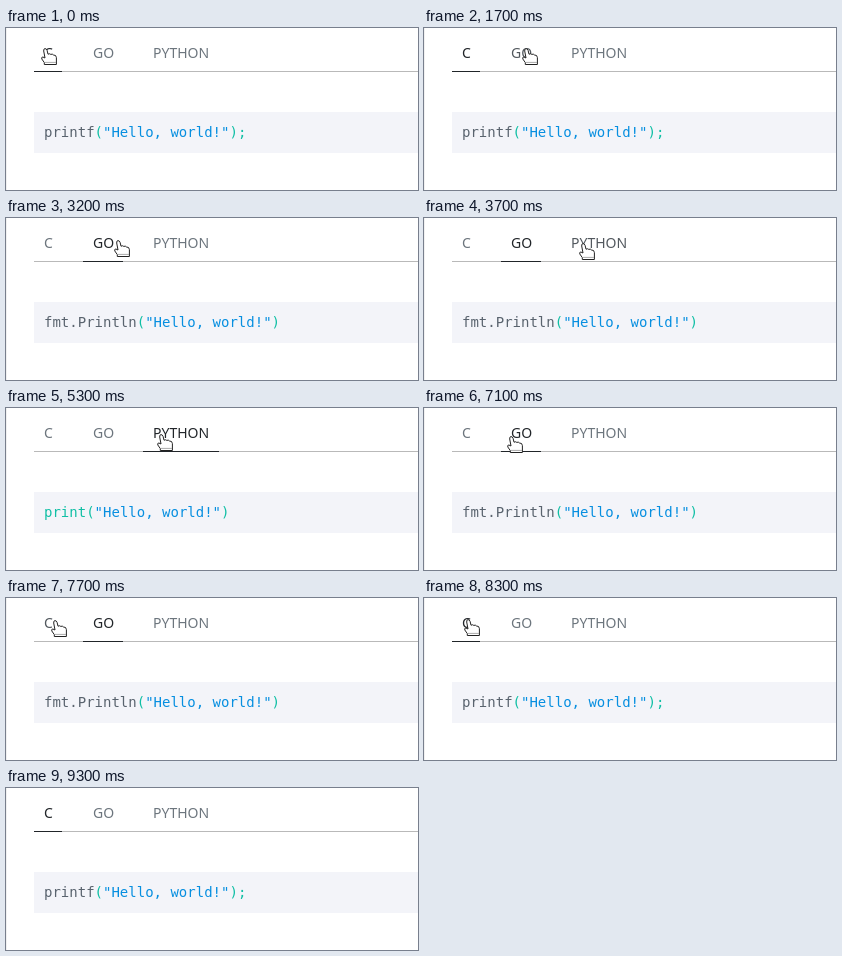
These frames come from a looping animation (412 px wide and 162 px high, 9600 ms). An HTML page:

```html
<!DOCTYPE html>
<html lang="en">
<head>
<meta charset="utf-8">
<title>Language tabs</title>
<style>
  html, body { margin: 0; width: 100%; height: 100%; overflow: hidden; background: #fff; }
  svg { display: block; width: 412px; height: 162px; }
  .tab { font: 14px "Noto Sans", "Open Sans", sans-serif; }
  .code { font: 14px "DejaVu Sans Mono", monospace; white-space: pre; }
  .plain { fill: #59636e; }
  .mark { fill: #10bfa5; }
  .string { fill: #078fe0; }
</style>
</head>
<body>
<svg viewBox="0 0 412 162">
  <rect width="412" height="162" fill="#fff"/>
  <rect width="1" height="162" fill="#f1f1f1"/>
  <rect x="28" y="43" width="384" height="1" fill="#b9b9b9"/>
  <rect x="28" y="84" width="384" height="41" fill="#f3f4f9"/>
  <g id="tabs"></g>
  <g id="hand" stroke="#222" stroke-linejoin="round">
    <path d="M4 10L2.7 3Q2.5 .6 4 .6T6.1 2.4L7 6.2Q8.6 5.2 9.8 6.4Q11.5 5.6 12.5 7Q15.2 6.7 15.4 9.6V16.5H3.3V14.6L.8 11Q.2 9 1.9 9Z" fill="#fff"/>
    <path d="M4 14.4H15" stroke="#aaa"/>
  </g>
</svg>
<script>
const LOOP = 9600, STEP = 100, EXIT = 9300;
const LEFT = 28, GAP = 20.5, PAD = 10, BOW = 3;
const IDLE = [108, 117, 125], HOVER = [82, 88, 94], ACTIVE = [33, 37, 41];

const tabs = [
  { label: "C", width: 28, call: "printf", kind: "plain", end: ");" },
  { label: "GO", width: 40, call: "fmt.Println", kind: "plain", end: ")" },
  { label: "PYTHON", width: 76, call: "print", kind: "mark", end: ")" }
];

const clicks = [
  { at: 0, tab: 0 },
  { at: 2200, tab: 1 },
  { at: 4400, tab: 2 },
  { at: 6500, tab: 1 },
  { at: 8200, tab: 0 }
];

// Where the pointer goes; a power above 1 starts slowly, below 1 quickly
const home = { x: 35, y: 20 };
const moves = [
  { leave: 1100, arrive: 1700, x: 98, y: 20, power: 1 },
  { leave: 3100, arrive: 3700, x: 155, y: 25, power: 1 },
  { leave: 5200, arrive: 5600, x: 96, y: 27, power: 2 },
  { leave: 7000, arrive: 7800, x: 40, y: 21, power: 0.7 },
  { leave: 9000, arrive: 9200, x: 42, y: 1, power: 4 }
];

const group = document.getElementById("tabs");
const hand = document.getElementById("hand");

function add(parent, name, attrs, text = "") {
  const node = document.createElementNS("http://www.w3.org/2000/svg", name);
  for (const key in attrs) node.setAttribute(key, attrs[key]);
  node.textContent = text;
  return parent.appendChild(node);
}

function build() {
  let x = LEFT;
  for (const tab of tabs) {
    tab.x = Math.round(x);
    x += tab.width + GAP;
    tab.text = add(group, "text", { class: "tab", x: tab.x + PAD, y: 30 }, tab.label);
    tab.line = add(group, "rect", { x: tab.x, y: 43, width: tab.width, height: 1, fill: "#212529" });
    tab.sample = add(group, "text", { class: "code", x: LEFT + PAD, y: 109 });
    const piece = (kind, text) => add(tab.sample, "tspan", { class: kind }, text);
    piece(tab.kind, tab.call);
    piece("mark", "(");
    piece("string", '"Hello, world!"');
    piece("mark", tab.end);
  }
}

const lerp = (a, b, k) => a + (b - a) * k;
const mix = (a, b, k) => a.map((v, i) => Math.round(lerp(v, b[i], k)));
const show = (node, visible) => node.setAttribute("visibility", visible ? "visible" : "hidden");

function pointerAt(t) {
  let { x, y } = home;
  for (const move of moves) {
    if (t <= move.leave) break;
    const u = Math.min(1, (t - move.leave) / (move.arrive - move.leave));
    const e = u ** move.power;
    x = lerp(x, move.x, e);
    y = lerp(y, move.y, e) + BOW * Math.sin(Math.PI * e);
  }
  return { x: Math.round(x), y: Math.round(y) };
}

function render(time) {
  const t = Math.floor((time % LOOP) / STEP) * STEP;
  const index = clicks.findLastIndex(click => click.at <= t);
  const active = clicks[index].tab;
  const previous = clicks[Math.max(0, index - 1)].tab;
  const fade = index && t === clicks[index].at ? 0.5 : 1;
  const { x, y } = pointerAt(t);
  const visible = t < EXIT;

  tabs.forEach((tab, i) => {
    const over = visible && y > 8 && x + 5 >= tab.x && x + 5 < tab.x + tab.width;
    const rest = over ? HOVER : IDLE;
    const color = i === active ? mix(rest, ACTIVE, fade)
      : i === previous ? mix(ACTIVE, rest, fade) : rest;
    tab.text.setAttribute("fill", `rgb(${color})`);
    show(tab.line, i === active);
    show(tab.sample, i === active);
  });
  hand.setAttribute("transform", `translate(${x} ${y})`);
  show(hand, visible);
}

build();
const begin = performance.now();
function tick() {
  render(performance.now() - begin);
  requestAnimationFrame(tick);
}
tick();
</script>
</body>
</html>
```
